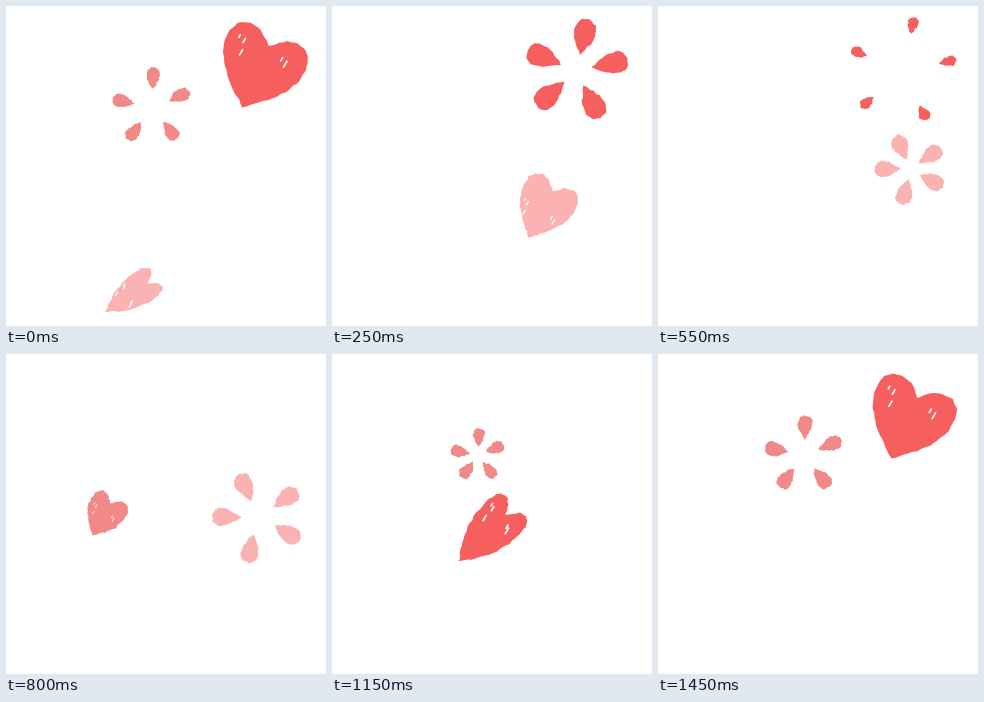
These frames come from a looping animation (320x320 px, 1.5 s). An HTML page with a canvas:

```html
<!DOCTYPE html>
<html lang="en">
<head>
<meta charset="utf-8">
<title>Hearts and petals</title>
<style>
  html, body { margin: 0; width: 100%; height: 100%; overflow: hidden; background: #fff; }
  canvas { display: block; width: 320px; height: 320px; }
</style>
</head>
<body>
<canvas id="stage" width="320" height="320"></canvas>
<script>
const ctx = document.getElementById('stage').getContext('2d');
const LOOP = 1500, STEP = 50, FLOWER_LIFE = 620;

// Each heart flies in an ease-out from one tip position to another,
// then bursts into a flower whose petals drift apart.
const items = [
  { color: '#f55f5d', start: 1132, fly: 485, burst: 398, from: [113, 221], to: [238.6, 99.5],
    size: 66, markY: .88, center: [244, 65], radius: 55, turn: 0 },
  { color: '#f08987', start: 640, fly: 560, burst: 470, from: [8, 273], to: [131, 130],
    size: 37, markY: .7, center: [146, 101.5], radius: 40.5, turn: -11 },
  { color: '#fab2b2', start: 0, fly: 700, burst: 480, from: [99, 306], to: [232, 204],
    size: 51, markY: .52, center: [253, 163], radius: 47.5, turn: 42 }
];

const mix = (a, b, k) => a + (b - a) * k;
const mod = (a, n) => ((a % n) + n) % n;
const noise = n => mod(Math.sin(n * 12.9898) * 43758.5453, 1) - .5;
const rad = deg => deg * Math.PI / 180;

// Points along a cubic curve, without its last point.
function curve([x0, y0], [x1, y1], [x2, y2], [x3, y3], count) {
  return Array.from({ length: count }, (_, i) => {
    const t = i / count, s = 1 - t;
    const a = s ** 3, b = 3 * s * s * t, c = 3 * s * t * t, d = t ** 3;
    return [a * x0 + b * x1 + c * x2 + d * x3, a * y0 + b * y1 + c * y2 + d * y3];
  });
}

// Closes a half outline by mirroring it across the x = 0 axis.
const mirror = half => half.concat(half.slice(1, -1).reverse().map(([x, y]) => [-x, y]));

// Both shapes stand on their tip at the origin and point along +y.
const HEART = mirror([
  ...curve([0, 0], [.24, .2], [.62, .46], [.64, .88], 16),
  ...curve([.64, .88], [.66, 1.22], [.3, 1.36], [0, 1], 16),
  [0, 1]
]);
const PETAL = mirror([
  ...curve([0, 0], [.16, .25], [.31, .45], [.3, .74], 8),
  ...curve([.3, .74], [.28, .92], [.14, 1], [0, 1], 6),
  [0, 1]
]);

// Maps shape space to the stage: turned clockwise from upright and scaled.
function placer([ox, oy], angle, wide, tall) {
  const cos = Math.cos(angle), sin = Math.sin(angle);
  return (x, y) => [
    ox + x * wide * cos + y * tall * sin,
    oy + x * wide * sin - y * tall * cos
  ];
}

// Fills an outline with a slightly ragged crayon edge.
function fillRough(shape, place, seed) {
  ctx.beginPath();
  shape.forEach(([u, v], i) => {
    const [x, y] = place(u, v);
    ctx.lineTo(x + noise(seed + i) * 1.6, y + noise(seed + i + 500) * 1.6);
  });
  ctx.fill();
}

function drawHeart(it, age, seed) {
  const p = 1 - (1 - Math.min(1, age / it.fly)) ** 3;
  const tip = it.from.map((v, i) => mix(v, it.to[i], p));
  const tilt = rad(56 - 33 * Math.sqrt(p));
  const place = placer(tip, tilt, it.size * (.5 + .52 * p), it.size);
  fillRough(HEART, place, seed);

  // uncoloured gaps in the crayon
  ctx.lineWidth = it.size * .025;
  ctx.beginPath();
  for (let i = 0; i < 5; i++) {
    const side = i % 2 ? 1 : -1, half = it.size * (.03 + .03 * noise(i + 7));
    const [x, y] = place(side * (.36 + .25 * noise(i + 1)), it.markY + .35 * noise(i + 20));
    ctx.moveTo(x - half * .6, y + half);
    ctx.lineTo(x + half * .6, y - half);
  }
  ctx.stroke();
}

function drawFlower(it, age, seed) {
  const u = age / FLOWER_LIFE;
  const inner = it.radius * (.18 + .3 * u + .52 * u ** 4);
  const outer = it.radius * (1 - .5 * Math.exp(-age / 90));
  const length = outer - inner;
  if (length <= 0) return;
  for (let i = 0; i < 5; i++) {
    // five petals, a little unevenly spread
    const angle = rad(13 + 70 * i - 5 * Math.sin(i * Math.PI / 2) + it.turn);
    const root = placer(it.center, angle, 1, 1)(0, inner);
    fillRough(PETAL, placer(root, angle, length, length), seed + i * 31);
  }
}

function draw(time) {
  const now = Math.floor(mod(time, LOOP) / STEP) * STEP;
  ctx.fillStyle = ctx.strokeStyle = '#fff';
  ctx.lineCap = 'round';
  ctx.fillRect(0, 0, 320, 320);
  items.forEach((it, n) => {
    const age = mod(now - it.start, LOOP), seed = now + n * 211;
    ctx.fillStyle = it.color;
    if (age < it.burst) drawHeart(it, age, seed);
    else if (age < it.burst + FLOWER_LIFE) drawFlower(it, age - it.burst, seed);
  });
}

const begin = performance.now();
function tick() {
  draw(performance.now() - begin);
  requestAnimationFrame(tick);
}
tick();
</script>
</body>
</html>
```
